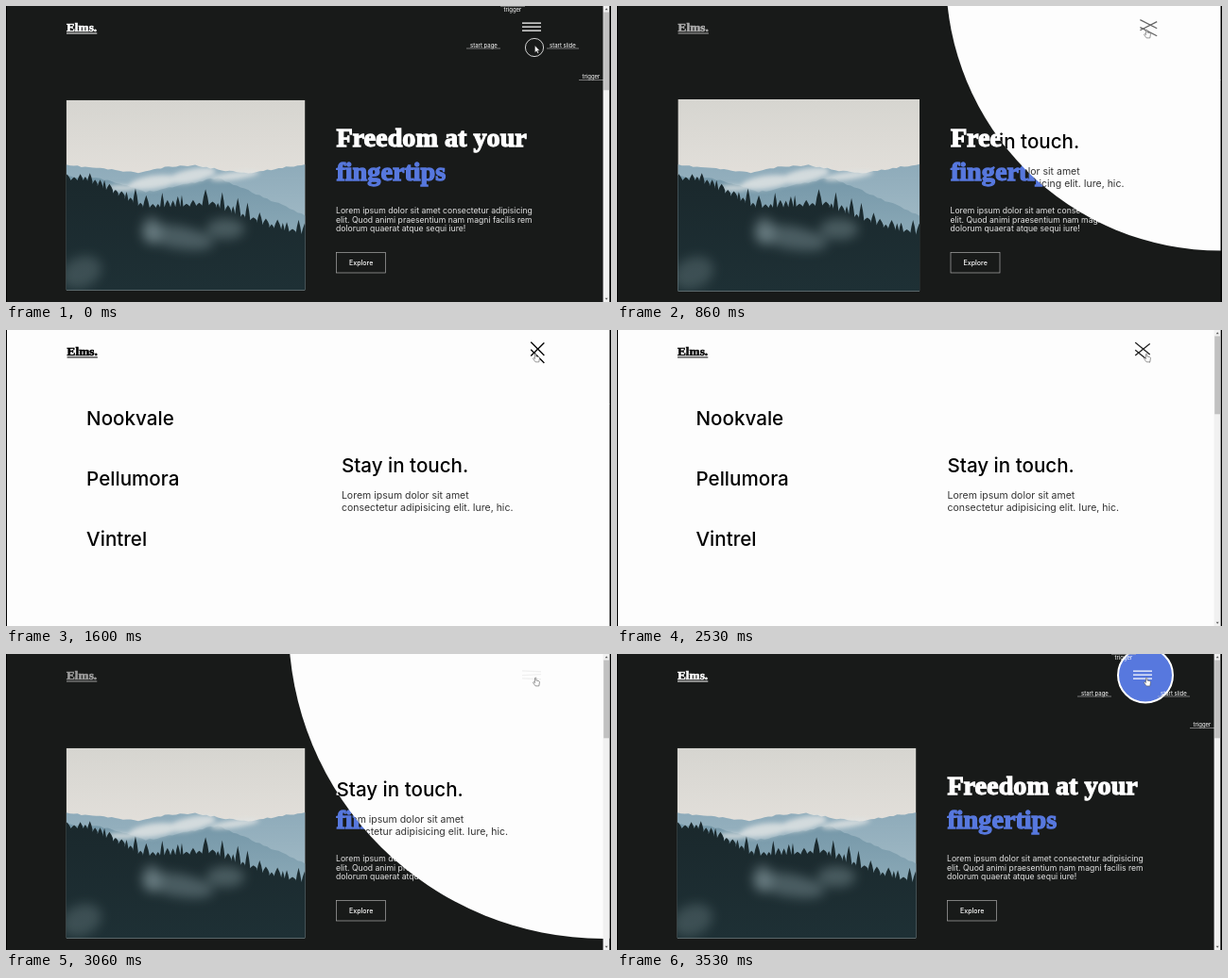
These frames come from a looping animation (640 by 314 pixels, 3.6 s). An HTML page:

```html
<!DOCTYPE html>
<html lang="en">
<head>
<meta charset="utf-8">
<title>Circle reveal menu</title>
<style>
  html, body { margin: 0; width: 100%; height: 100%; overflow: hidden; background: #000; }
  svg { display: block; width: 100vw; height: 100vh; }
  text { font-family: Inter, "Open Sans", sans-serif; white-space: pre; }
  .serif { font-family: "Liberation Serif", "Times New Roman", serif; font-weight: 700; }
  .title { font-size: 28.2px; stroke-width: 1.3px; }
  .copy { font-size: 8.64px; fill: #e4e4e4; }
  .link { font-size: 20.6px; font-weight: 500; }
  .small { font-size: 10.5px; fill: #333; }
  .mark text { font-size: 6px; fill: #fff; }
  .mark path { stroke: #bbb; stroke-width: .6; }
</style>
</head>
<body>
<svg viewBox="0 0 640 314" preserveAspectRatio="none">
  <defs>
    <clipPath id="page"><rect x="1" width="637.5" height="314"/></clipPath>
    <clipPath id="reveal"><circle id="hole" cy="-31"/></clipPath>
    <clipPath id="frame"><rect width="252" height="201"/></clipPath>
    <linearGradient id="sky" x2="0" y2="1">
      <stop offset="0" stop-color="#d6d5d0"/><stop offset=".4" stop-color="#e2dfda"/>
    </linearGradient>
    <linearGradient id="far" x2="0" y2="1">
      <stop offset="0" stop-color="#8eabba"/><stop offset="1" stop-color="#b4c8d0"/>
    </linearGradient>
    <linearGradient id="mid" x2="0" y2="1">
      <stop offset="0" stop-color="#7597a8"/><stop offset="1" stop-color="#9fbac5"/>
    </linearGradient>
    <linearGradient id="wood" x2="0" y2="1">
      <stop offset="0" stop-color="#1a282c"/><stop offset="1" stop-color="#1e3035"/>
    </linearGradient>
    <filter id="soft" x="-50%" y="-50%" width="200%" height="200%"><feGaussianBlur stdDeviation="6"/></filter>
    <filter id="puff" x="-50%" y="-50%" width="200%" height="200%"><feGaussianBlur stdDeviation="2.5"/></filter>
  </defs>

  <g clip-path="url(#page)">
    <rect width="640" height="314" fill="#181a19"/>

    <g id="photo"><g clip-path="url(#frame)">
      <rect width="252" height="201" fill="url(#sky)"/>
      <path id="farHill" fill="url(#far)"/>
      <path id="midHill" fill="url(#mid)"/>
      <g fill="#dfe3e3" filter="url(#puff)" opacity=".85">
        <ellipse cx="92" cy="87" rx="26" ry="7" transform="rotate(-8 92 87)"/>
        <ellipse cx="132" cy="80" rx="26" ry="7" transform="rotate(-12 132 80)"/>
        <ellipse cx="178" cy="80" rx="26" ry="4" transform="rotate(-8 178 80)"/>
        <ellipse cx="58" cy="93" rx="15" ry="3"/>
      </g>
      <path id="forest" fill="url(#wood)"/>
      <g fill="#8ba0a5" filter="url(#soft)">
        <ellipse cx="118" cy="145" rx="38" ry="12" opacity=".42" transform="rotate(10 118 145)"/>
        <ellipse cx="90" cy="138" rx="10" ry="15" opacity=".45"/>
        <ellipse cx="168" cy="136" rx="20" ry="11" opacity=".4"/>
        <ellipse cx="16" cy="182" rx="22" ry="16" opacity=".28" transform="rotate(-25 16 182)"/>
      </g>
    </g></g>

    <g id="hero">
      <text class="serif title" x="349.4" y="148.7" fill="#fff" stroke="#fff">Freedom at your</text>
      <text class="serif title" x="349.4" y="184.7" fill="#5778de" stroke="#5778de">fingertips</text>
      <text class="copy" x="349" y="219.8">Lorem ipsum dolor sit amet consectetur adipisicing</text>
      <text class="copy" x="349" y="229.6">elit. Quod animi praesentium nam magni facilis rem</text>
      <text class="copy" x="349" y="239.4">dolorum quaerat atque sequi iure!</text>
      <rect x="349.5" y="261.5" width="52" height="21.5" fill="none" stroke="#aaa" stroke-width=".7"/>
      <text x="363" y="274.6" font-size="7.05" font-weight="500" fill="#fff">Explore</text>
    </g>

    <circle id="ring" cx="559" stroke="#fff" fill="#5778de"/>

    <g id="marks" class="mark">
      <text x="526.5" y="5.8">trigger</text><path d="M523 .4H549"/>
      <text x="491" y="43.6">start page</text><path d="M487 45H523"/>
      <text x="575" y="43.6">start slide</text><path d="M572 45H606"/>
      <text x="609.5" y="76.6">trigger</text><path d="M606 78.5H633"/>
    </g>

    <g clip-path="url(#reveal)">
      <rect width="640" height="314" fill="#fdfdfd"/>
      <g id="links">
        <text class="link" x="83.5" y="100.5">Nookvale</text>
        <text class="link" x="83.5" y="164.5">Pellumora</text>
        <text class="link" x="83.5" y="228.5">Vintrel</text>
      </g>
      <g id="touch">
        <text class="link" x="349.5" y="151">Stay in touch.</text>
        <text class="small" x="349.5" y="179.2">Lorem ipsum dolor sit amet</text>
        <text class="small" x="349.5" y="192.4">consectetur adipisicing elit. Iure, hic.</text>
      </g>
    </g>

    <g id="logo">
      <text class="serif" x="64" y="27.4" font-size="13.3" stroke-width=".6">Elms.</text>
      <path d="M64 29H96.3" stroke-width="1"/>
    </g>
    <g id="burger" stroke-width="1.3">
      <path d="M-10 0H10"/><path d="M-10 0H10"/><path d="M-10 0H10"/>
    </g>

    <g id="bar">
      <rect x="631.6" width="7" height="314" fill="#f1f1f1"/>
      <rect x="632.2" y="6.5" width="6" height="82.8" fill="#c1c1c1"/>
      <path d="M633.7 4.3h3l-1.5-2zM633.7 309.7h3l-1.5 2z" fill="#555"/>
    </g>

    <path id="arrow" d="M0 0V7.2L1.7 5.7 2.9 8.2 4 7.7 2.9 5.3H5Z" fill="#fff" stroke="#333" stroke-width=".4"/>
    <path id="hand" transform="translate(557.5 24.5)" fill="#fff" stroke="#555" stroke-width=".6" stroke-linejoin="round"
      d="M2 5V1Q2.7 0 3.4 1V3.6L6 4.1Q7 4.4 6.9 5.6L6.3 9.4H2.6L.2 6.2Q0 5 1 5.2L2 6Z"/>
  </g>
</svg>

<script>
const LOOP = 3600, STEP = 200 / 3;
const OPEN_AT = 660, CLOSE_AT = 2530, HOVER_AT = 430;
const R_MIN = 17, R_MAX = 833;
const $ = id => document.getElementById(id);

// horizontal offset of each block when the scrollbar is gone
const SHIFT = { hero: 3.5, marks: 7, links: 1.6, touch: 5.4, logo: .6 };

// tween clocks: [loop time, tween time]
const OPENING = [[667, 0], [867, 185], [1133, 514], [1600, 1000]];
const CLOSING = [[2533, 33], [3067, 378], [3533, 900], [3600, 1000]];
const POINTER_Y = [[0, 44], [67, 44], [200, 38], [400, 24]];

const clamp = v => Math.min(1, Math.max(0, v));
const mix = (a, b, p) => a + (b - a) * p;
const easeOut = p => 1 - (1 - clamp(p)) ** 2;
const grey = p => { const v = Math.round(255 * (1 - p)); return `rgb(${v},${v},${v})`; };

function track(keys, x) {
  if (x <= keys[0][0]) return keys[0][1];
  for (let i = 1; i < keys.length; i++) {
    const [x0, y0] = keys[i - 1], [x1, y1] = keys[i];
    if (x < x1) return mix(y0, y1, (x - x0) / (x1 - x0));
  }
  return keys[keys.length - 1][1];
}

let seed = 11;
const rand = () => (seed = seed * 16807 % 2147483647) / 2147483647;

function hill(id, ridge, rough) {
  let d = 'M0 201';
  for (let x = 0; x <= 252; x += 4) d += `L${x} ${(track(ridge, x) + (rand() - .5) * rough).toFixed(1)}`;
  $(id).setAttribute('d', d + 'V201Z');
}

function trees(id, ridge) {
  let d = 'M-4 201';
  for (let x = -3; x < 256;) {
    const w = 3 + rand() * 5, y = track(ridge, x), h = 3 + rand() ** 2 * 15;
    d += `L${x} ${y}L${x + w * .2} ${y - h * .5}L${x + w / 2} ${y - h}L${x + w * .8} ${y - h * .5}L${x + w} ${y}`;
    x += w;
  }
  $(id).setAttribute('d', d + 'V201Z');
}

hill('farHill', [[0, 69], [35, 72], [75, 77], [105, 71], [136, 69], [170, 75], [195, 77], [225, 72], [252, 68]], 1.5);
hill('midHill', [[0, 80], [40, 84], [85, 97], [130, 88], [160, 82], [195, 97], [252, 122]], 2);
trees('forest', [[0, 85], [20, 85], [50, 99], [80, 114], [115, 113], [150, 111], [180, 122], [215, 135], [252, 143]]);

const lines = [...$('burger').children];
const move = (el, x, y, extra = '') => el.setAttribute('transform', `translate(${x} ${y})${extra}`);
const show = (el, on) => el.setAttribute('visibility', on ? 'visible' : 'hidden');

function layout(wide) {
  for (const id in SHIFT) move($(id), wide ? SHIFT[id] : 0, 0);
  if (wide) move($('photo'), 64.4, 99, ' scale(1.015 1.012)');
  else move($('photo'), 63.7, 99.8, ' scale(1.003)');
  show($('bar'), !wide);
  $('hole').setAttribute('cx', wide ? 638.6 : 631.8);
}

function draw(t) {
  const wide = t > OPEN_AT && t < CLOSE_AT;
  const closing = t >= CLOSE_AT;
  const clock = track(closing ? CLOSING : OPENING, t);
  const toOpen = p => closing ? 1 - p : p;
  const slow = toOpen(easeOut(clock / 1000));
  const fast = toOpen(easeOut(clock / 500));

  layout(wide);
  $('hole').setAttribute('r', mix(R_MIN, R_MAX, slow));
  $('logo').setAttribute('fill', grey(slow));
  $('logo').setAttribute('stroke', grey(slow));

  $('burger').setAttribute('stroke', grey(fast));
  lines.forEach((line, i) => {
    const dir = i === 1 ? -1 : 1;
    move(line, wide ? 562.3 : 556, 18.2 + i * 4 + dir * 1.7 * fast, ` rotate(${dir * 45 * fast})`);
  });

  const y = track(POINTER_Y, t), hover = easeOut((t - HOVER_AT) / 270);
  const stroke = mix(.8, 2, hover), ring = $('ring');
  ring.setAttribute('cy', mix(y, y - 1.5, hover));
  ring.setAttribute('r', mix(10, 30, hover) - stroke / 2);
  ring.setAttribute('stroke-width', stroke);
  ring.setAttribute('fill-opacity', hover);
  move($('arrow'), 559.5, y - 2);
  show($('arrow'), t < HOVER_AT);
  show($('hand'), t >= HOVER_AT);
}

// the motion advances at 15 pictures per second
function tick() {
  const t = performance.now() % LOOP;
  draw(Math.floor((t + 7) / STEP) % 54 * STEP);
  requestAnimationFrame(tick);
}
tick();
</script>
</body>
</html>
```
